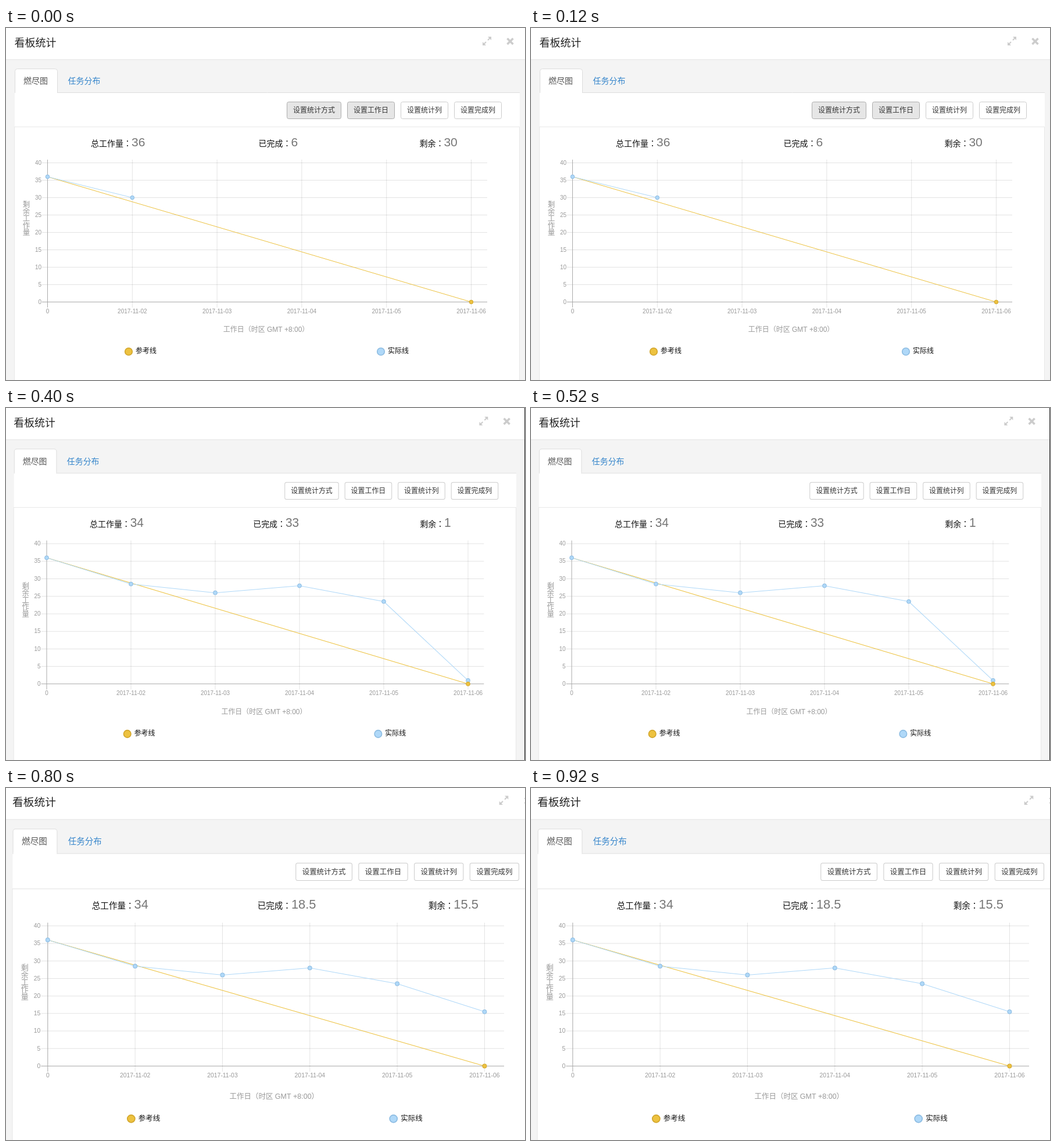
An HTML page with a canvas that plays this animation: 893x607 px, repeating every 1 s.

```html
<!DOCTYPE html>
<html>
<head>
<meta charset="utf-8">
<title>看板统计</title>
<style>
html, body { margin: 0; width: 100%; height: 100%; overflow: hidden; background: #fff; }
canvas { display: block; }
</style>
</head>
<body>
<canvas id="stage" width="893" height="607"></canvas>
<script>
const ctx = document.getElementById('stage').getContext('2d');
const SANS = '"Liberation Sans", "Noto Sans CJK SC", "Noto Sans CJK", sans-serif';
// Centres full-width punctuation in its cell
const CENTRED = '"Liberation Sans", "Noto Sans CJK TC", "Noto Sans CJK", sans-serif';
const YELLOW = ['#edc240', '#d2a62c'], BLUE = ['#afd8f8', '#8dbce2'];
const DATES = ['0', '2017-11-02', '2017-11-03', '2017-11-04', '2017-11-05', '2017-11-06'];
const TOP = 232.5;

// view: scale x, scale y, offset x, offset y; foot: shift of everything under the chart
const base = { left: 71.5, right: 800.5, height: 240, foot: 0, pressed: 0 };
const scenes = [
  { view: [1, 1, 0, 0], totals: [36, 6, 30], data: [36, 30], pressed: 2 },
  { view: [1.0027, 1, -1.2, 1], totals: [39, 11, 28], data: [36, 28.5, 26, 28] },
  { view: [.9945, 1.0075, -1.1, -.2], totals: [34, 33, 1], data: [36, 28.5, 26, 28, 23.5, 1] },
  { view: [.9931, 1.043, -1, -8.3], totals: [39, 11, 28], data: [36, 28.5, 26, 28, 28],
    height: 206, foot: -34 },
  { view: [1.04, 1.031, -4.1, -1.9], totals: [34, 18.5, 15.5], data: [36, 28.5, 26, 28, 23.5, 15.5],
    left: 73, right: 795.7, height: 234.4, foot: -3 }
].map(s => ({ ...base, ...s }));

function text(str, x, middle, size, color, align = 'left', family = SANS) {
  ctx.font = `${size}px ${family}`;
  ctx.textAlign = align;
  ctx.fillStyle = color;
  ctx.fillText(str, x, middle + size * .37);
}

function box(x, y, w, h, radius, fill, stroke) {
  ctx.beginPath();
  ctx.roundRect(x, y, w, h, radius);
  ctx.fillStyle = fill;
  ctx.fill();
  if (stroke) {
    ctx.lineWidth = 1;
    ctx.strokeStyle = stroke;
    ctx.stroke();
  }
}

function path(points, color, width = 1) {
  ctx.beginPath();
  points.forEach(p => ctx.lineTo(...p));
  ctx.strokeStyle = color;
  ctx.lineWidth = width;
  ctx.stroke();
}

function dot(x, y, r, [fill, stroke], width = 1) {
  ctx.beginPath();
  ctx.arc(x, y, r, 0, 7);
  ctx.fillStyle = fill;
  ctx.fill();
  ctx.lineWidth = width;
  ctx.strokeStyle = stroke;
  ctx.stroke();
}

function icons() {
  for (const d of [-1, 1]) {
    const x = 827.5 + d * 7.5, y = 22.5 - d * 7.5;
    ctx.beginPath();
    ctx.moveTo(x, y);
    ctx.lineTo(x - d * 6, y);
    ctx.lineTo(x, y + d * 6);
    ctx.fillStyle = '#ccc';
    ctx.fill();
    path([[x - d * 2, y + d * 2], [x - d * 6, y + d * 6]], '#ccc', 2);
    path([[867.5 - 5, 23 - d * 5], [867.5 + 5, 23 + d * 5]], '#ccc', 3.6);
  }
}

function frame(s) {
  box(-1, -1.5, 899, 800, 4, '#f4f4f4');
  box(-1, -1.5, 899, 55.5, [4, 4, 0, 0], '#fff');
  path([[-1, 54.5], [898, 54.5]], '#e5e5e5');
  text('看板统计', 14.5, 25.5, 18, '#222');
  icons();

  box(15, 111, 869, 60, 0, '#fff');
  path([[15, 111.5], [884, 111.5]], '#ddd');
  box(14.5, 170.5, 869, 452 + s.foot, 0, '#fff', '#e8e8e8');
  box(15.5, 70.5, 73, 41, [4, 4, 0, 0], '#fff', '#ddd');
  ctx.fillStyle = '#fff';
  ctx.fillRect(16, 110, 72, 3);
  text('燃尽图', 30, 91, 14, '#555');
  text('任务分布', 106.5, 91, 14, '#3585cb');

  let x = 483;
  ['设置统计方式', '设置工作日', '设置统计列', '设置完成列'].forEach((label, i) => {
    const w = label.length * 12 + 22, on = i < s.pressed;
    box(x + .5, 127.5, w - 1, 29, 3, on ? '#e6e6e6' : '#fff', on ? '#adadad' : '#ccc');
    text(label, x + w / 2, 142, 12, '#333', 'center');
    x += w + 10;
  });

  ['总工作量：', '已完成：', '剩余：'].forEach((label, i) => {
    ctx.font = `21px ${SANS}`;
    const w = label.length * 14;
    const start = 192.7 + i * 275.7 - (w + ctx.measureText(s.totals[i]).width) / 2;
    text(label, start, 198.8, 14, '#111', 'left', CENTRED);
    text(s.totals[i], start + w, 196.2, 21, '#777');
  });
}

function chart(s) {
  const bottom = TOP + s.height;
  const px = i => s.left + (s.right - s.left) * i / 5;
  const py = v => bottom - s.height * v / 40;

  for (let v = 0; v <= 40; v += 5) {
    path([[62, py(v)], [828, py(v)]], v ? 'rgba(0,0,0,.11)' : '#aaa');
    text(v, 61, py(v) - .5, 10, '#999', 'right');
  }
  DATES.forEach((date, i) => {
    path([[px(i), TOP - 5.5], [px(i), bottom + 9.5]], i ? 'rgba(0,0,0,.11)' : '#aaa');
    text(date, px(i), bottom + 15.5, 10, '#999', 'center');
  });
  [...'剩余工作量'].forEach((c, i) =>
    text(c, 35, 304 + i * 12 + (s.height - 240) / 3, 12.5, '#999', 'center'));

  const actual = s.data.map((v, i) => [px(i), py(v)]);
  path([[px(0), py(36)], [px(5), py(0)]], YELLOW[0]);
  path(actual, BLUE[0]);
  actual.forEach(p => dot(...p, 3.3, BLUE));
  dot(px(5), py(0), 3.3, YELLOW);
}

function footer(s) {
  text('工作日（时区 GMT +8:00）', 447.5, 520 + s.foot, 12, '#999', 'center', CENTRED);
  [['参考线', 211, YELLOW], ['实际线', 645, BLUE]].forEach(([label, x, color]) => {
    dot(x, 558 + s.foot, 6.3, color, 1.6);
    text(label, x + 12, 557 + s.foot, 12, '#111');
  });
}

function draw() {
  const s = scenes[Math.floor(performance.now() % 1000 / 200)];
  const [sx, sy, tx, ty] = s.view;
  ctx.setTransform(1, 0, 0, 1, 0, 0);
  ctx.fillStyle = '#333';
  ctx.fillRect(0, 0, 893, 607);
  ctx.setTransform(sx, 0, 0, sy, tx, ty);
  frame(s);
  chart(s);
  footer(s);
  requestAnimationFrame(draw);
}
draw();
</script>
</body>
</html>
```
